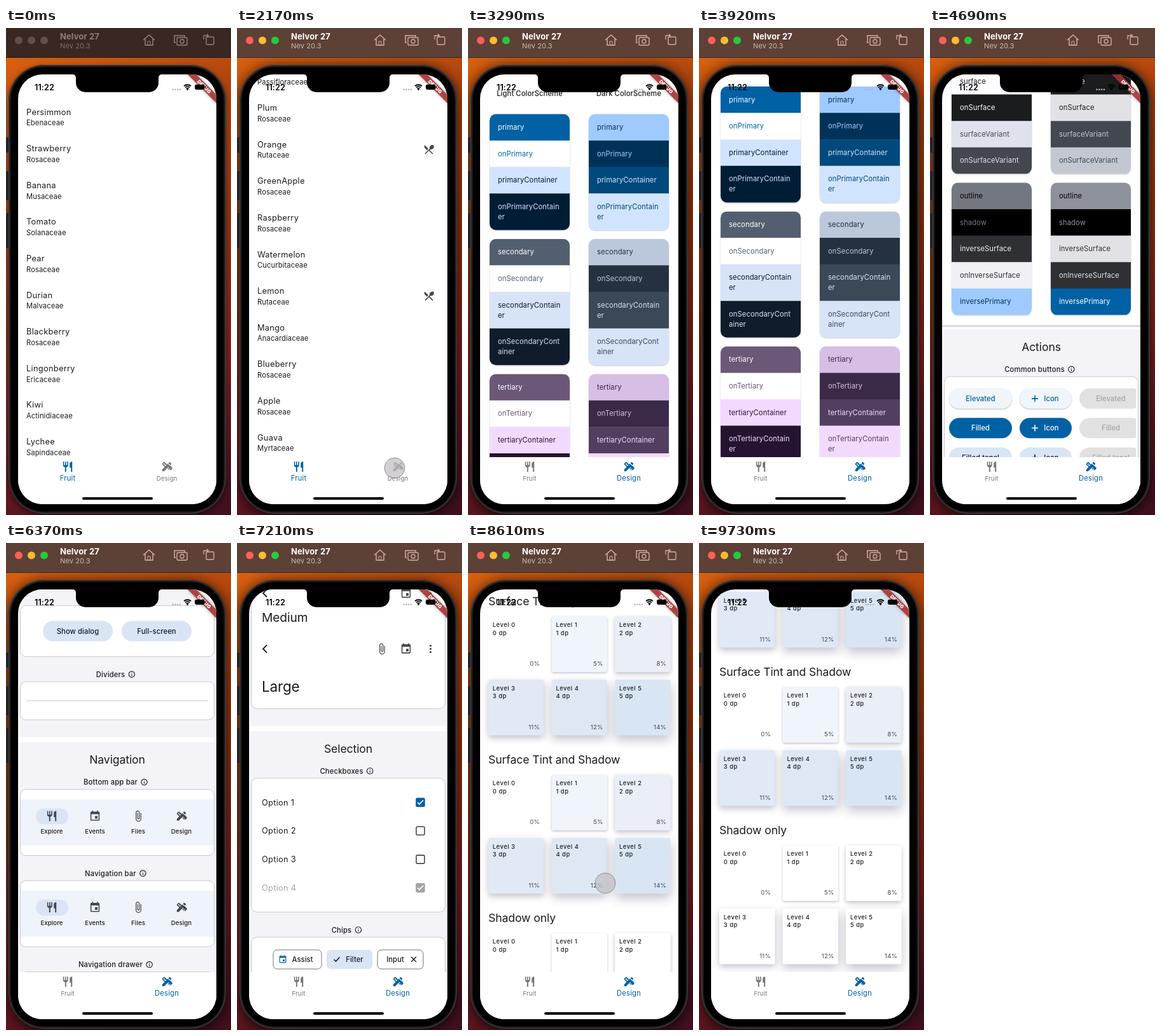
An HTML page with a canvas for the animation above (9.8 s loop, 354x766 px).

```html
<!DOCTYPE html>
<html lang="en">
<head>
<meta charset="utf-8">
<style>
html, body { margin: 0; width: 100%; height: 100%; overflow: hidden; background: #000; }
canvas { display: block; width: 354px; height: 766px; }
</style>
</head>
<body>
<canvas id="stage"></canvas>
<script>
const W = 354, H = 766, LOOP = 9800, STEP = 70;
const canvas = document.getElementById('stage'), c = canvas.getContext('2d');
const dpr = window.devicePixelRatio || 1;
canvas.width = W * dpr; canvas.height = H * dpr;

const BLUE = '#0061a4', INK = '#1a1c1e', GREY = '#a4a4a6', TONAL = '#d9e5f4', LIGHT = '#d1e4ff', LINE = '#73777f';
const clamp = u => Math.min(1, Math.max(0, u));
const ease = u => 1 - (1 - clamp(u) ** 1.3) ** 3;

// ---------- drawing helpers ----------
function text(s, x, y, size = 11.2, color = INK, { align = 'left', weight = 400, ls = .1 } = {}) {
  c.font = `${weight} ${size}px Inter, Roboto, sans-serif`;
  c.letterSpacing = ls + 'px'; c.textAlign = align; c.fillStyle = color;
  c.fillText(s, x, y + size * .36);
  return c.measureText(s).width;
}
const label = (s, x, y, color = INK, size = 11.2) => text(s, x, y, size, color, { align: 'center', weight: 500 });
const heading = (s, x, y, size = 17.6, align = 'left') => text(s, x, y, size, INK, { align, ls: -.1 });

function box(x, y, w, h, r = 0, fill, stroke, lw = 1) {
  c.beginPath(); c.roundRect(x, y, w, h, r); paint(fill, stroke, lw);
}
function circle(x, y, r, fill, stroke, lw = 1) {
  c.beginPath(); c.arc(x, y, r, 0, 7); paint(fill, stroke, lw);
}
function paint(fill, stroke, lw = 1) {
  if (fill) { c.fillStyle = fill; c.fill(); }
  if (stroke) { c.strokeStyle = stroke; c.lineWidth = lw; c.stroke(); }
}
function line(points, color, lw = 1.5) {
  c.beginPath(); points.forEach(([x, y]) => c.lineTo(x, y)); paint(null, color, lw);
}
function shadowed(blur, dy, draw, color = 'rgba(30,30,70,.3)') {
  c.save();
  c.shadowBlur = blur * dpr; c.shadowOffsetY = dy * dpr; c.shadowColor = blur ? color : 'transparent';
  draw(); c.restore();
}
function clipped(x, y, w, h, r, draw) {
  c.save(); c.beginPath(); c.roundRect(x, y, w, h, r); c.clip(); draw(); c.restore();
}

// 24-unit icons
const icons = {
  fork: 'M11 9H9V2H7v7H5V2H3v7c0 2.12 1.66 3.84 3.75 3.97V22h2.5v-9.03C11.34 12.84 13 11.12 13 9V2h-2v7zm5-3v8h2.5v8H21V2c-2.76 0-5 2.24-5 4z',
  menu: 'M8.1 13.34l2.83-2.83L3.91 3.5c-1.56 1.56-1.56 4.09 0 5.66l4.19 4.18zm6.78-1.81c1.53.71 3.68.21 5.27-1.38 1.91-1.91 2.28-4.65.81-6.12-1.46-1.46-4.2-1.1-6.12.81-1.59 1.59-2.09 3.74-1.38 5.27L3.7 19.87l1.41 1.41L12 14.41l6.88 6.88 1.41-1.41L13.41 13l1.47-1.47z',
  design: 'M16.24 11.51l1.57-1.57-3.75-3.75-1.57 1.57-4.14-4.13c-.78-.78-2.05-.78-2.83 0l-1.9 1.9c-.78.78-.78 2.05 0 2.83l4.13 4.13L3 17.25V21h3.75l6.76-6.76 4.13 4.13c.95.95 2.23.6 2.83 0l1.9-1.9c.78-.78.78-2.05 0-2.83l-4.13-4.13zM9.18 11.07L5.04 6.94l1.89-1.9L8.2 6.31 7.02 7.5l1.41 1.41 1.19-1.19 1.45 1.45-1.89 1.9zm7.88 7.89l-4.13-4.13 1.9-1.9 1.45 1.45-1.19 1.19 1.41 1.41 1.19-1.19 1.27 1.27-1.9 1.89zM20.71 7.04c.39-.39.39-1.02 0-1.41l-2.34-2.34c-.47-.47-1.12-.29-1.41 0l-1.83 1.83 3.75 3.75 1.83-1.83z',
  event: 'M17 12h-5v5h5v-5zM16 1v2H8V1H6v2H5c-1.1 0-2 .9-2 2v14c0 1.1.9 2 2 2h14c1.1 0 2-.9 2-2V5c0-1.1-.9-2-2-2h-1V1h-2zm3 18H5V8h14v11z',
  clip: 'M16.5 6v11.5c0 2.21-1.79 4-4 4s-4-1.79-4-4V5c0-1.38 1.12-2.5 2.5-2.5s2.5 1.12 2.5 2.5v10.5c0 .55-.45 1-1 1s-1-.45-1-1V6H10v9.5c0 1.38 1.12 2.5 2.5 2.5s2.5-1.12 2.5-2.5V5c0-2.21-1.79-4-4-4S7 2.79 7 5v12.5c0 3.04 2.46 5.5 5.5 5.5s5.5-2.46 5.5-5.5V6h-1.5z',
};
for (const k in icons) icons[k] = new Path2D(icons[k]);
function icon(name, x, y, color = '#43474e', size = 19.2) {
  c.save(); c.translate(x - size / 2, y - size / 2); c.scale(size / 24, size / 24);
  c.fillStyle = color; c.fill(icons[name]); c.restore();
}
function plus(x, y, r, color, lw = 1.6) {
  line([[x - r, y], [x + r, y]], color, lw); line([[x, y - r], [x, y + r]], color, lw);
}
const tick = (x, y, color) => line([[x - 4.5, y], [x - 1.5, y + 3], [x + 4.5, y - 3.5]], color, 1.6);
function gear(x, y, color, solid) {
  c.beginPath();
  for (let k = 0; k < 24; k++) {
    const r = k % 4 < 2 ? 7.5 : 5.8, a = (k + 1.5) * Math.PI / 12;
    c.lineTo(x + r * Math.cos(a), y + r * Math.sin(a));
  }
  c.closePath();
  if (solid) { c.moveTo(x + 2.6, y); c.arc(x, y, 2.6, 0, 7); c.fillStyle = color; c.fill('evenodd'); }
  else { paint(null, color, 1.4); circle(x, y, 2.4, null, color, 1.4); }
}
function button(s, x, y, w, { fill, stroke, color = BLUE, raised } = {}) {
  shadowed(raised ? 2 : 0, 1, () => box(x, y - 16, w, 32, 16, fill, stroke));
  if (s === 'Icon') { plus(x + 24, y, 5, color); label(s, x + 50, y, color); }
  else label(s, x + w / 2, y, color);
}
function checkbox(x, y, on, color) {
  box(x - 6.5, y - 6.5, 13, 13, 1.6, on && color, color, 1.6);
  if (on) tick(x, y, '#fff');
}

// ---------- fruit page ----------
const fruits = `Persimmon Ebenaceae,Strawberry Rosaceae,Banana Musaceae,Tomato Solanaceae,Pear Rosaceae,Durian Malvaceae,
Blackberry Rosaceae,Lingonberry Ericaceae,Kiwi Actinidiaceae,Lychee Sapindaceae,Pineapple Bromeliaceae,Fig Moraceae,
Gooseberry Grossulariaceae,Passionfruit Passifloraceae,Plum Rosaceae,Orange Rutaceae,GreenApple Rosaceae,
Raspberry Rosaceae,Watermelon Cucurbitaceae,Lemon Rutaceae,Mango Anacardiaceae,Blueberry Rosaceae,Apple Rosaceae,
Guava Myrtaceae`.split(',').map(s => s.trim().split(' '));
function fruitPage(t) {
  const scroll = 812.9 * ease((t - 560) / 700);
  fruits.forEach(([name, family], i) => {
    const y = 132 + i * 57.6 - scroll;
    text(name, 32, y, 12.8, INK, { ls: .3 });
    text(family, 32, y + 17.3);
    if (family === 'Rutaceae') icon('menu', 302, y + 8);
  });
}

// ---------- colour schemes ----------
const schemes = [
  ['primary onPrimary primaryContainer onPrimaryContain|er', '0061a4 ffffff d1e4ff 001d36', '9ecaff 003258 00497d d1e4ff'],
  ['secondary onSecondary secondaryContain|er onSecondaryCont|ainer', '535f70 ffffff d7e3f7 101c2b', 'bbc7db 253140 3b4858 d7e3f7'],
  ['tertiary onTertiary tertiaryContainer onTertiaryContain|er', '6b5778 ffffff f2daff 251431', 'd6bee4 3b2948 523f5f f2daff'],
  ['error onError errorContainer onErrorContainer', 'ba1a1a ffffff ffdad6 410002', 'ffb4ab 690005 93000a ffdad6'],
  ['background onBackground surface onSurface surfaceVariant onSurfaceVariant', 'fdfcff 1a1c1e fdfcff 1a1c1e dfe2eb 43474e', '1a1c1e e2e2e6 1a1c1e e2e2e6 43474e c3c7cf'],
  ['outline shadow inverseSurface onInverseSurface inversePrimary', '73777f 000000 2f3033 f1f0f4 9ecaff 00325a', '8d9199 000000 e2e2e6 2f3033 0061a4 ffffff'],
].map(([names, ...modes]) => ({ names: names.split(' '), modes: modes.map(m => m.split(' ').map(v => '#' + v)) }));
const rowHeight = name => name.includes('|') ? 57.6 : 41.6;
function schemePage() {
  label('Light ColorScheme', 97, 150); label('Dark ColorScheme', 253, 150);
  let top = 182;
  for (const { names, modes } of schemes) {
    const height = names.reduce((sum, n) => sum + rowHeight(n), 0);
    modes.forEach((colors, m) => {
      const x = 34 + m * 156;
      shadowed(2, 1, () => box(x, top, 126, height, 10, '#fff'));
      clipped(x, top, 126, height, 10, () => {
        let y = top;
        names.forEach((name, i) => {
          box(x, y, 126, rowHeight(name) + .5, 0, colors[i]);
          name.split('|').forEach((part, k) => text(part, x + 13, y + 20.6 + k * 16, 11.2, colors[i ^ 1]));
          y += rowHeight(name);
        });
      });
    });
    top += height + 14;
  }
  box(19, top + 2, 312, 3, 0, '#d3d8e0');
}

// ---------- component panels ----------
function commonButtons(y) {
  const styles = [
    ['Elevated', { fill: '#eff5fa', raised: true }], ['Filled', { fill: BLUE, color: '#fff' }],
    ['Filled tonal', { fill: TONAL, color: '#101c2b' }], ['Outlined', { stroke: LINE }], ['Text', {}]];
  clipped(24, y, 300, 254, 0, () => styles.forEach(([name, style], i) => {
    const cy = y + 34.5 + i * 46.4;
    button(name, 30, cy, 99, style);
    button('Icon', 141, cy, 82, style);
    button(name, 235, cy, 99, { fill: i < 3 && '#e1e1e2', stroke: i === 3 && '#dddddf', color: GREY });
  }));
}
function fabs(y) {
  const cy = y + 54;
  [[40, 33, 10], [82, 94, 13], [182, 46.5, 13], [235, 79, 22]].forEach(([x, w, r], i) => {
    const h = i === 1 ? 46.5 : w;
    shadowed(7, 4, () => box(x, cy - h / 2, w, h, r, LIGHT));
    plus(i === 1 ? 106 : x + w / 2, cy, i === 3 ? 8.5 : 5.4, '#001d36', i === 3 ? 2.2 : 1.6);
  });
  label('Create', 140.5, cy, '#001d36');
}
function iconButtons(y) {
  [0, 1].forEach(row => [63, 138, 212, 286].forEach((x, i) => {
    const cy = y + 35 + row * 46.4;
    if (i) circle(x, cy, 16, i < 3 && (row ? '#e1e1e2' : i === 1 ? '#dfe2eb' : TONAL), i === 3 && (row ? '#ddd' : LINE));
    gear(x, cy, row ? GREY : i === 1 ? BLUE : i === 2 ? '#101c2b' : '#43474e', i === 2);
  }));
}
function segmented(x, y, names, on) {
  const w = 270 / names.length;
  clipped(x, y - 16, 270, 32, 16, () => box(x + on * w, y - 16, w, 32, 0, TONAL));
  box(x, y - 16, 270, 32, 16, null, LINE);
  names.forEach((n, i) => {
    if (i) line([[x + i * w, y - 16], [x + i * w, y + 16]], LINE, 1);
    label(n, x + (i + .5) * w, y);
  });
}
const buttonRow = (...names) => (y, h) => names.forEach((n, i) => {
  const w = 110, x = 175 + (i - (names.length - 1) / 2) * 124 - w / 2;
  button(n, x, y + h / 2, w, { fill: TONAL, color: '#101c2b' });
});
const optionRows = (names, control) => y => names.forEach((n, i) => {
  const cy = y + 38 + i * 44.8, off = i === 3;
  text(n, 39, cy, 12.8, off ? GREY : INK, { ls: .3 });
  control(288.5, cy, i, off);
});
function navBar(y, height) {
  box(23, y + 16, 304, height - 32, 0, '#eff3fa');
  const cy = y + height / 2;
  box(47, cy - 22, 51, 25, 13, TONAL);
  ['fork', 'event', 'clip', 'design'].forEach((n, i) => icon(n, 72 + i * 68, cy - 10));
  ['Explore', 'Events', 'Files', 'Design'].forEach((n, i) => label(n, 72 + i * 68, cy + 14, INK, 9.6));
}
function sideMenu(y, h) {
  const names = ['Inbox', 'Outbox', 'Favorites', 'Trash', 'Family', 'School', 'Work'];
  box(52, y + 16, 246, h - 32, 13, '#eff3fa');
  names.slice(0, Math.floor((h - 50) / 45)).forEach((n, i) => {
    const cy = y + 48 + i * 45;
    if (!i) box(62, cy - 20, 226, 40, 20, TONAL);
    icon('event', 86, cy); text(n, 108, cy, 11.2, INK, { weight: 500 });
  });
}
function topBars(y, h) {
  const bottom = y + h;
  [300, 241, 181.5, 94].forEach(d => {
    const cy = bottom - d;
    line([[47, cy - 6], [41, cy], [47, cy + 6]], INK, 1.8);
    icon('clip', 228, cy); icon('event', 266, cy);
    [-5, 0, 5].forEach(k => circle(304.5, cy + k, 1.6, '#43474e'));
  });
  heading('Center-aligned', 145, bottom - 300, 17.6, 'center');
  heading('Small', 66, bottom - 241);
  heading('Medium', 39, bottom - 143.5, 19.2);
  heading('Large', 39, bottom - 34.5, 22.4);
}
function chips(y) {
  [0, 1].forEach(row => {
    const cy = y + 35 + row * 46, color = row ? GREY : INK, stroke = row ? '#ddd' : LINE;
    box(57, cy - 15, 76, 30, 6, null, stroke); icon('event', 72, cy, row ? GREY : BLUE, 14.4); label('Assist', 103, cy, color);
    box(141, cy - 15, 72, 30, 6, row ? '#e1e1e2' : TONAL); tick(157, cy, color); label('Filter', 185, cy, color);
    box(221, cy - 15, 72, 30, 6, null, stroke); label('Input', 249, cy, color);
    line([[274, cy - 4], [282, cy + 4]], color); line([[282, cy - 4], [274, cy + 4]], color);
  });
}
function sampleCards(y) {
  ['Elevated', 'Filled', 'Outlined'].forEach((n, i) => {
    const top = y + 20 + i * 98;
    shadowed(i ? 0 : 3, 1, () => box(125, top, 100, 84, 10, ['#f4f7fc', '#dfe2eb', '#fff'][i], i === 2 && '#c3c7cf'));
    text(n, 137, top + 66);
  });
}
function sliders(y) {
  [.3, .6].forEach((v, i) => {
    const cy = y + 40 + i * 46;
    line([[45, cy], [305, cy]], TONAL, 3); line([[45, cy], [45 + 260 * v, cy]], BLUE, 3);
    circle(45 + 260 * v, cy, 8, BLUE);
  });
}
function textFields(y) {
  ['Filled', 'Outlined', 'Disabled'].forEach((n, i) => {
    const top = y + 24 + i * 64;
    box(40, top, 270, 45, 4, i ? null : '#dfe2eb', i ? LINE : null);
    text(n, 53, top + 22, 12.8, i === 2 ? GREY : '#43474e');
  });
}

const options = [1, 2, 3, 4].map(n => 'Option ' + n);
const panels = [
  ['Actions', [['Common buttons', 254, commonButtons], ['Floating action buttons', 108, fabs], ['Icon buttons', 116, iconButtons],
    ['Segmented buttons', 124, y => { segmented(40, y + 36, ['Day', 'Week', 'Month', 'Year'], 1); segmented(40, y + 86, ['XS', 'S', 'M', 'L', 'XL'], 3); }]]],
  ['Communication', [['Badges', 104, navBar],
    ['Progress indicators', 84, (y, h) => { c.beginPath(); c.arc(75, y + h / 2, 14, -1.6, 3); paint(null, BLUE, 3); box(115, y + h / 2 - 1.5, 185, 3, 0, TONAL); box(115, y + h / 2 - 1.5, 130, 3, 0, BLUE); }],
    ['Snackbar', 80, buttonRow('Show snackbar')]]],
  ['Containment', [['Bottom sheet', 80, buttonRow('Show modal', 'Show sheet')], ['Cards', 320, sampleCards],
    ['Dialog', 80, buttonRow('Show dialog', 'Full-screen')], ['Dividers', 60, (y, h) => line([[32, y + h / 2], [318, y + h / 2]], '#c3c7cf', 1)]]],
  ['Navigation', [['Bottom app bar', 104, navBar], ['Navigation bar', 104, navBar], ['Navigation drawer', 380, sideMenu],
    ['Navigation rail', 300, sideMenu], ['Tabs', 104, navBar], ['Top app bars', 340, topBars]]],
  ['Selection', [['Checkboxes', 210.5, optionRows(options, (x, y, i, off) => checkbox(x, y, !i || off, off ? GREY : i ? '#43474e' : BLUE))],
    ['Chips', 116, chips], ['Date picker', 80, buttonRow('Show date')], ['Menus', 80, buttonRow('Color', 'Icon')],
    ['Radio buttons', 165, optionRows(options.slice(0, 3), (x, y, i) => { circle(x, y, 7, null, i ? '#43474e' : BLUE, 1.6); if (!i) circle(x, y, 3.8, BLUE); })],
    ['Sliders', 126, sliders],
    ['Switches', 165, optionRows(options.slice(0, 3), (x, y, i) => { box(x - 20, y - 12, 40, 24, 12, i ? '#dfe2eb' : BLUE, i ? LINE : BLUE); circle(x + (i ? -8 : 8), y, i ? 6 : 9, i ? LINE : '#fff'); })],
    ['Time picker', 80, buttonRow('Show time')]]],
  ['Text inputs', [['Text fields', 222, textFields]]],
].map(([title, items]) => ({ title, items }));

const schemesEnd = 182 + schemes.flatMap(s => s.names).reduce((sum, n) => sum + rowHeight(n), 0) + schemes.length * 14;
let flow = schemesEnd + 9;
for (const p of panels) {
  p.top = flow;
  p.height = 34.5 + p.items.reduce((sum, [, h]) => sum + h + 39.5, 0) + 27.5;
  flow += p.height + 8;
}
const elevationTop = flow + 40;

function drawPanel({ title, items, top, height }) {
  box(20, top, 311, height, 0, '#f4f3f8');
  heading(title, 175, top + 27.5, 17.6, 'center');
  let y = top + 62.5;
  for (const [name, h, draw] of items) {
    const w = text(name, 164.5, y, 11.2, INK, { align: 'center', weight: 500, ls: .2 });
    const ix = 164.5 + w / 2 + 10.5;
    circle(ix, y, 4.7, null, INK, 1.1); line([[ix, y - .6], [ix, y + 2.6]], INK, 1.1); line([[ix, y - 2.6], [ix, y - 1.5]], INK, 1.1);
    box(22.5, y + 11.5, 305, h, 9, '#fff', '#cbcad2');
    draw(y + 11.5, h);
    y += h + 39.5;
  }
}

// ---------- elevation ----------
const tints = ['#fff', '#eff5fa', '#e9eef7', '#e0e9f5', '#dde8f4', '#d8e6f4'];
const percents = [0, 5, 8, 11, 12, 14];
function elevation() {
  ['Surface Tint only', 'Surface Tint and Shadow', 'Shadow only'].forEach((title, s) => {
    const top = elevationTop + s * 249;
    heading(title, 32, top);
    percents.forEach((percent, i) => {
      const x = 32 + i % 3 * 99.6, y = top + 23.5 + Math.floor(i / 3) * 99.6;
      shadowed(i * 3.6, i * 1.4, () => box(x, y, 87.5, 87.5, 3, s === 2 ? '#fff' : tints[i]), 'rgba(30,20,60,.27)');
      text('Level ' + i, x + 6.8, y + 13.5, 9.3, INK, { weight: 500, ls: .55 });
      text(i + ' dp', x + 6.8, y + 26, 9.3, INK, { weight: 500, ls: .55 });
      text(percent + '%', x + 81, y + 74, 9.6, '#43474e', { align: 'right', ls: .2 });
    });
  });
}

// ---------- design page scrolling ----------
const first = panels[0].top - 94, selection = panels[4].top - 296;
const halfway = first + (selection - first) * .55;
const flings = [
  [3010, 3920, 90], [4270, 5250, first], [5670, 6650, halfway],
  [6720, 7700, halfway + (selection - halfway) / ease(.5)],
  [7770, 8610, elevationTop - 92], [8820, 9730, elevationTop + 46]];
function designPage(t) {
  const scroll = flings.reduce((pos, [a, b, to]) => pos + (to - pos) * ease((t - a) / (b - a)), 0);
  const visible = (top, height) => top < scroll + 690 && top + height > scroll + 60;
  c.save(); c.translate(0, -scroll);
  if (visible(0, panels[0].top)) schemePage();
  panels.filter(p => visible(p.top, p.height)).forEach(drawPanel);
  if (visible(elevationTop - 20, 800)) elevation();
  c.restore();
}

// ---------- device and window ----------
function backdrop() {
  const g = c.createLinearGradient(0, 47, 250, H);
  [[0, '#d9600f'], [.2, '#b0440e'], [.5, '#93300f'], [.75, '#7c1d20'], [1, '#42101f']].forEach(s => g.addColorStop(...s));
  box(0, 0, W, H, 0, g);
}
function titleBar(on) {
  box(0, 0, W, 46, 0, on ? '#5d4036' : '#3a2722');
  box(0, 46, W, 1, 0, on ? '#3b2a24' : '#2a1d1a');
  ['#ff5f57', '#febc2e', '#28c840'].forEach((color, i) => circle(20 + i * 20, 19.5, 6, on ? color : '#624f4a'));
  text('Nelvor 27', 85, 13.5, 13, on ? '#fff' : '#8f7c76', { weight: 700 });
  text('Nev 20.3', 85, 28, 11, on ? '#cdbab2' : '#806e68');
  const ink = on ? '#d0aea1' : '#94807a';
  line([[216, 19], [225, 11], [234, 19]], ink); line([[219, 17], [219, 27], [231, 27], [231, 17]], ink);
  box(223, 21, 4, 6, 0, null, ink);
  line([[267, 23], [265, 23], [265, 12], [281, 12], [281, 14]], ink);
  box(269, 15, 16, 12, 2, null, ink, 1.4); circle(277, 21, 3, null, ink, 1.3);
  box(315, 14, 12, 12, 1.5, null, ink, 1.4);
  line([[311, 18], [311, 12], [318, 12]], ink, 1.3); line([[316, 9.5], [318.5, 12], [316, 14.5]], ink, 1.3);
}
function phone(focused) {
  clipped(0, 47, W, H - 47, 0, () => shadowed(focused ? 22 : 10, 3,
    () => box(4, 58, 342, 706, 56, '#1f1f21'), `rgba(0,0,0,${focused ? .8 : .5})`));
  [[172, 24], [225, 46], [291, 55]].forEach(([y, h]) => box(0, y, 5, h, 1.5, '#232325'));
  box(4.5, 58.5, 341, 705, 56, '#1f1f21', '#454345');
  box(7.5, 61.5, 335, 699, 52, '#000');
  box(19, 73, 312, 676, 38, '#fff');
}
function tabs(t) {
  box(19, 675, 312, 74, 0, '#fff');
  const p = clamp((t - 2310) / 210);
  if (t >= 2240 && t < 2660) circle(253, 695, 10 + (t - 2240) / 10, `rgba(0,0,0,${.06 * (2660 - t) / 420})`);
  [['Fruit', 'fork', 97, 1 - p], ['Design', 'design', 253, p]].forEach(([name, glyph, x, on]) => {
    const color = `rgb(${117 * (1 - on)},${117 - 20 * on},${117 + 47 * on})`;
    icon(glyph, x, 690, color);
    text(name, x, 708.3, 9.6 + 1.6 * on, color, { align: 'center', ls: .2 });
  });
}
function statusBar() {
  c.save(); c.translate(331, 73); c.rotate(Math.PI / 4);
  shadowed(5, 0, () => box(-40, 22.4, 80, 9.6, 0, 'rgba(172,50,50,.85)'), 'rgba(0,0,0,.4)');
  text('DEBUG', 0, 27.2, 7.6, '#fff', { align: 'center', weight: 900 });
  c.restore();
  text('11:22', 45, 93.5, 12.6, '#000', { weight: 600 });
  [262.5, 266.3, 270.1, 273.9].forEach(x => circle(x, 96.8, 1.3, '#b5b5b8'));
  [2.6, 5.4, 8.2].forEach(r => { c.beginPath(); c.arc(285.5, 97.5, r, -2.3, -.84); paint(null, '#000', 1.9); });
  circle(285.5, 96.8, 1.2, '#000');
  box(297, 89, 15.5, 8, 2.4, '#000'); box(313, 91.5, 1.3, 3, .6, '#000');
  c.fillStyle = '#000'; c.beginPath();
  c.moveTo(105, 72); c.lineTo(105, 73); c.arcTo(110, 73, 110, 78, 5); c.arcTo(110, 101, 126, 101, 15);
  c.arcTo(240, 101, 240, 85, 15); c.arcTo(240, 73, 245, 73, 5); c.lineTo(245, 72); c.fill();
  box(120, 738, 111, 4, 2, '#000');
}

// start, end, x, first y, last y
const touches = [
  [560, 770, 176, 590, 360], [1260, 1400, 176, 360, 360], [2170, 2310, 248, 692, 692], [3010, 3150, 181, 560, 480],
  [4270, 4410, 181, 574, 400], [5250, 5460, 181, 574, 574], [5670, 5810, 181, 574, 400], [6720, 6860, 200, 560, 390],
  [7770, 7910, 210, 550, 390], [8610, 8820, 216, 535, 535], [8820, 8960, 216, 535, 470]];
function touch(t) {
  for (const [a, b, x, y0, y1] of touches)
    if (t >= a && t < b) circle(x, y0 + (y1 - y0) * (t - a) / (b - a), 16, 'rgba(192,190,194,.72)', 'rgba(120,120,122,.75)');
}

function frame() {
  const t = Math.floor(performance.now() % LOOP / STEP) * STEP, focused = t >= 560;
  c.setTransform(dpr, 0, 0, dpr, 0, 0);
  backdrop();
  titleBar(focused);
  phone(focused);
  clipped(19, 73, 312, 676, 38, () => {
    (t < 2310 ? fruitPage : designPage)(t);
    tabs(t);
    statusBar();
  });
  touch(t);
  requestAnimationFrame(frame);
}
frame();
</script>
</body>
</html>
```
